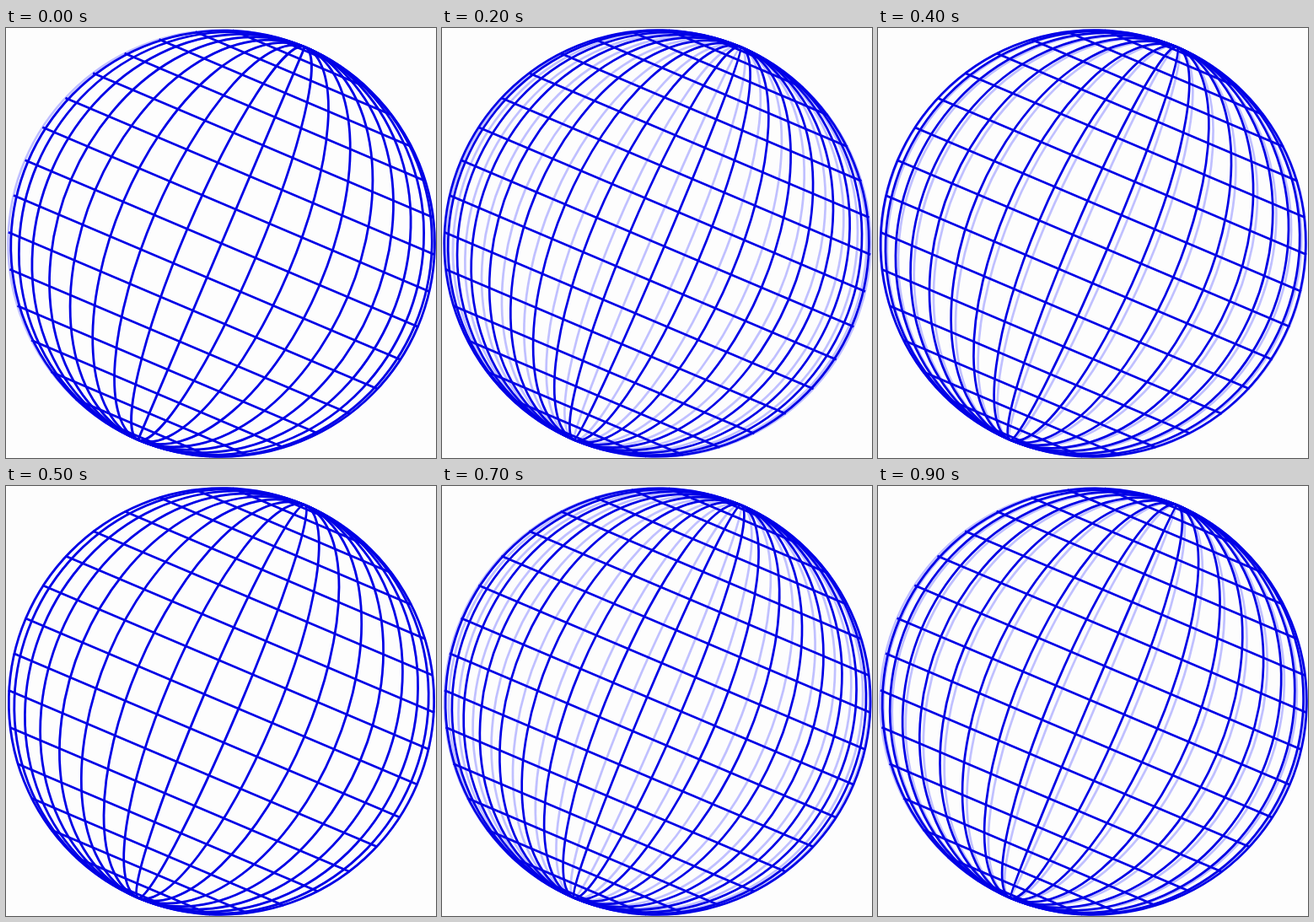
Write an HTML page with a canvas that moves like this. It is 510 px wide and 510 px high and loops after 1 s.

```html
<!DOCTYPE html>
<html lang="en">
<head>
<meta charset="utf-8">
<title>Rotating globe</title>
<style>
  html, body { margin: 0; width: 100%; height: 100%; overflow: hidden; background: #fdfdfd; }
  canvas { display: block; width: 510px; height: 510px; }
</style>
</head>
<body>
<canvas id="globe" width="510" height="510"></canvas>
<script>
const ctx = document.getElementById('globe').getContext('2d');
const CENTER = 255.5, RADIUS = 253, TILT = 23, GAP = 10;
const STEP_MS = 100, STEPS = 10;
const FRONT = '#0000e6', BACK = '#c0c0ff', PAPER = '#fdfdfd';
const rad = deg => deg * Math.PI / 180;

// Half ellipse from pole to pole, bulging east or west.
function meridian(lon) {
  const s = Math.sin(rad(lon));
  const start = s < 0 ? Math.PI / 2 : -Math.PI / 2;
  ctx.beginPath();
  ctx.ellipse(0, 0, RADIUS * Math.abs(s), RADIUS, 0, start, start + Math.PI);
  ctx.stroke();
}

// The axis lies in the picture plane, so parallels are straight.
function parallel(lat) {
  const x = RADIUS * Math.cos(rad(lat)), y = -RADIUS * Math.sin(rad(lat));
  ctx.beginPath();
  ctx.moveTo(-x, y);
  ctx.lineTo(x, y);
  ctx.stroke();
}

function draw(turn) {
  ctx.setTransform(1, 0, 0, 1, 0, 0);
  ctx.fillStyle = PAPER;
  ctx.fillRect(0, 0, 510, 510);
  ctx.translate(CENTER, CENTER);
  ctx.rotate(rad(TILT));
  ctx.lineWidth = 2.7;

  ctx.strokeStyle = BACK;
  for (let lon = -90 - turn; lon <= 90; lon += GAP) if (lon >= -90) meridian(lon);

  ctx.strokeStyle = FRONT;
  for (let lat = -80; lat <= 80; lat += GAP) parallel(lat);
  for (let lon = turn - 90; lon <= 90; lon += GAP) if (lon > -90) meridian(lon);
}

let shown = -1;
function tick() {
  const step = Math.floor(performance.now() / STEP_MS) % STEPS;
  if (step !== shown) draw((shown = step) * GAP / STEPS);
  requestAnimationFrame(tick);
}
tick();
</script>
</body>
</html>
```
